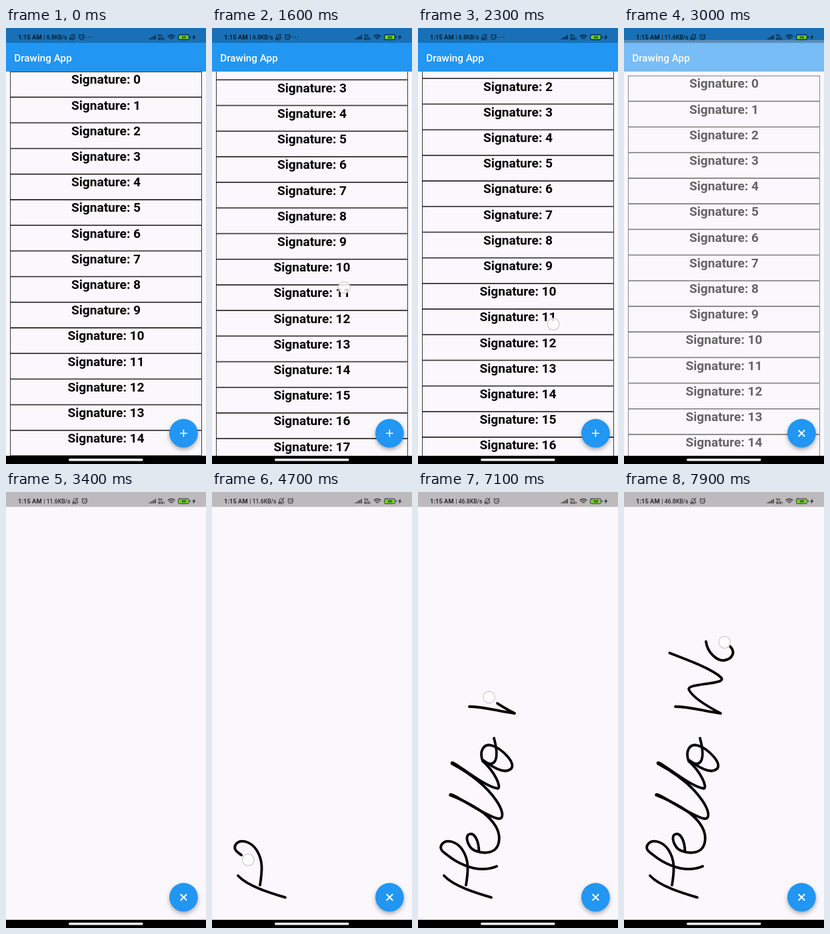
Recreate the animation shown at these times as an HTML page. Size 300 by 650 pixels, loop 8 s.

```html
<!DOCTYPE html>
<html lang="en">
<head>
<meta charset="utf-8">
<title>Drawing App</title>
<style>
  html, body { margin: 0; width: 100%; height: 100%; overflow: hidden; background: #faf8fc; }
  svg { display: block; width: 300px; height: 650px; font-family: Roboto, sans-serif; }
  .row text { font-size: 19.1px; font-weight: 600; text-anchor: middle; }
  .row rect { fill: none; stroke: #000; stroke-width: .764; }
  .title { font-size: 15.28px; font-weight: 500; fill: #fff; }
  .line { fill: none; stroke: #000; stroke-opacity: .75; stroke-width: 1; stroke-linecap: round; }
  .ink path { fill: none; stroke: #000; stroke-width: 3.8; stroke-linecap: round; stroke-linejoin: round; }
  .fab { filter: drop-shadow(0 3px 3px rgba(0, 0, 0, .32)); }
</style>
</head>
<body>
<svg viewBox="0 0 300 650">
  <clipPath id="view"><rect y="65" width="300" height="573"/></clipPath>
  <rect width="300" height="650" fill="#faf8fc"/>
  <g clip-path="url(#view)"><g id="list"></g></g>
  <rect y="22" width="300" height="43" fill="#2196f3"/>
  <text class="title" x="12.2" y="49.5">Drawing App</text>
  <rect width="300" height="22.2" fill="#1970b6"/>

  <g id="page">
    <rect y="22" width="300" height="616" fill="#faf8fc"/>
    <rect y="18" width="300" height="4.2" fill="#bcbabd"/>
  </g>
  <rect id="pageTop" width="300" height="18" fill="#bcbabd"/>

  <g fill-opacity=".78">
    <text x="18" y="17" font-size="9.4" font-weight="700">1:15 AM</text>
    <text id="speed" x="56.4" y="17" font-size="8.6" font-weight="500"></text>
  </g>
  <g id="notices" class="line">
    <path d="M-4 2.5H4C2.6 1 3 -.5 2.6 -2C2 -4.6 -2 -4.6 -2.6 -2C-3 -.5 -2.6 1 -4 2.5M-1 4.2H1M-4 4.5L4 -4.5"/>
    <circle cx="13.8" cy=".3" r="3.6"/>
    <path d="M12.6 .2L13.8 1.2L15.4 -.3M9.6 -2.8L11.2 -4.2M18 -2.8L16.4 -4.2"/>
    <path id="dots" d="M21 0h.01M25 0h.01M29 0h.01" stroke-width="1.4"/>
  </g>
  <g class="line">
    <path d="M214 17v-.5M216.5 17v-2M219 17v-3.5M221.5 17v-5M224 17v-6.5" stroke-width="1.5" stroke-linecap="butt"/>
    <path d="M243 12.2Q248 8 253 12.2M244.8 14Q248 11.3 251.2 14M246.6 15.8Q248 14.8 249.4 15.8" stroke-width="1.3"/>
    <rect x="258.5" y="10" width="16" height="7.4" rx="1.8"/>
    <path d="M276.5 12.7v2"/>
  </g>
  <rect x="259.5" y="11" width="14" height="5.4" rx="1" fill="#6fd022"/>
  <g font-weight="700" fill-opacity=".75">
    <text x="228" y="13" font-size="5.4">Vo</text>
    <text x="228" y="17.6" font-size="5">WiFi</text>
    <text x="263.4" y="16" font-size="6">99</text>
    <path d="M283 9.7L279 14.2H281.4L280.4 17.7L284.6 12.9H282.1Z"/>
  </g>

  <g class="ink">
    <path data-time="3970 4250" d="M39 572C54 588 88 598 110 604.5"/>
    <path data-time="4350 4950" d="M72 586C76 562 76 548 67 534S42 517 36 525S40 538 45 542S84 572 118 558"/>
    <path data-time="5150 5650" d="M91.5 536C91 518 84 508 77.5 510S73 522 79 530S116 545 121 523S107 475 48.5 452"/>
    <path data-time="5650 5950" d="M48.5 452C44 443 108 488 122 487S118 441 51 405"/>
    <path data-time="5950 6210" d="M51 405C46 394 98 440 120 442C125 440 116 418 97 401"/>
    <path data-time="6210 6640" d="M97 401C92 388 97 374 111 378S149 405 139 413S112 410 98 400C112 412 124 404 114 367"/>
    <path data-time="6850 7540" d="M77 320C100 320 120 327 145 330C122 318 103 306 97.5 295S158 288 145 276S100 252 68.5 240"/>
    <path data-time="7650 7930" d="M123 223C125 240 140 252 150 251S170 240 158 229L151 224"/>
  </g>

  <g class="fab"><circle cx="266.4" cy="604.2" r="21.4" fill="#2196f3"/></g>
  <path id="icon" d="M-5.4 0H5.4M0 -5.4V5.4" stroke="#fff" stroke-width="1.6"/>
  <circle id="touch" r="8.8" fill="#fff" fill-opacity=".82" stroke="#c9c8cc" stroke-width="1.2"/>
  <rect y="637.8" width="300" height="12.2"/>
  <rect x="94" y="642" width="111.5" height="3.4" rx="1.7" fill="#fff"/>
</svg>
<script>
const LOOP = 8000, STEP = 100, LEAD = 40;
const ROW = 38.2, ROWS = 20, PAD = 6.1, BAR = 65, FAB = [266.4, 604.2];
const $ = id => document.getElementById(id);
const mix = (a, b, p) => a + (b - a) * p;
const span = (t, from, to) => Math.min(1, Math.max(0, (t - from) / (to - from)));
const easeOut = p => Math.sin(p * Math.PI / 2);
const easeInOut = p => (1 - Math.cos(p * Math.PI)) / 2;

$("list").innerHTML = Array.from({ length: ROWS }, (_, i) =>
  `<g class="row" transform="translate(${PAD} ${i * ROW})">
    <rect x=".382" y=".382" width="${300 - 2 * PAD - .764}" height="${ROW - .764}"/>
    <text x="${150 - PAD}" y="18.4">Signature: ${i}</text>
  </g>`).join("");

const strokes = [...document.querySelectorAll(".ink path")].map(path => {
  const [from, to] = path.dataset.time.split(" ").map(Number);
  return { path, from, to, length: path.getTotalLength() };
});

// Scroll offset and finger of the drag up and the drag back.
function drag(t) {
  const up = easeOut(span(t, 1150, 2000)), back = easeInOut(span(t, 2000, 2600));
  return {
    offset: mix(PAD, 144.5, up) * (1 - back),
    finger: [mix(185, 203, up), mix(426, 373, up) + 137 * back]
  };
}

function draw(t) {
  const early = t < 2700, open = t >= 2800, shade = span(t, 2800, 3300);
  const { offset, finger } = drag(t);
  $("list").setAttribute("transform", `translate(0 ${BAR + PAD - offset})`);
  $("page").setAttribute("opacity", shade);
  $("pageTop").setAttribute("opacity", t > 3000 ? shade : 0);
  $("speed").textContent = `| ${early ? 6.8 : t < 6700 ? 11.6 : 46.8}KB/s`;
  $("notices").setAttribute("transform", `translate(${early ? 99.6 : 104} 13.5)`);
  $("dots").style.display = early ? "" : "none";
  $("icon").setAttribute("transform", `translate(${FAB}) ${open ? "rotate(45) scale(1.25)" : ""}`);

  let spot = null;
  if (t >= 1000 && t <= 2500) spot = finger;
  if (t >= 2700 && t <= 2800) spot = FAB;
  for (const { path, from, to, length } of strokes) {
    path.style.display = t > from ? "" : "none";
    path.setAttribute("stroke-dasharray", `${length * span(t, from, to)} ${length + 9}`);
    if (t >= from && t <= to) {
      const tip = path.getPointAtLength(length * span(t + LEAD, from, to));
      spot = [tip.x, tip.y];
    }
  }
  $("touch").style.display = spot ? "" : "none";
  if (spot) $("touch").setAttribute("transform", `translate(${spot})`);
}

const start = performance.now();
function tick() {
  const t = (performance.now() - start) % LOOP;
  draw(Math.floor(t / STEP) * STEP);
  requestAnimationFrame(tick);
}
tick();
</script>
</body>
</html>
```
